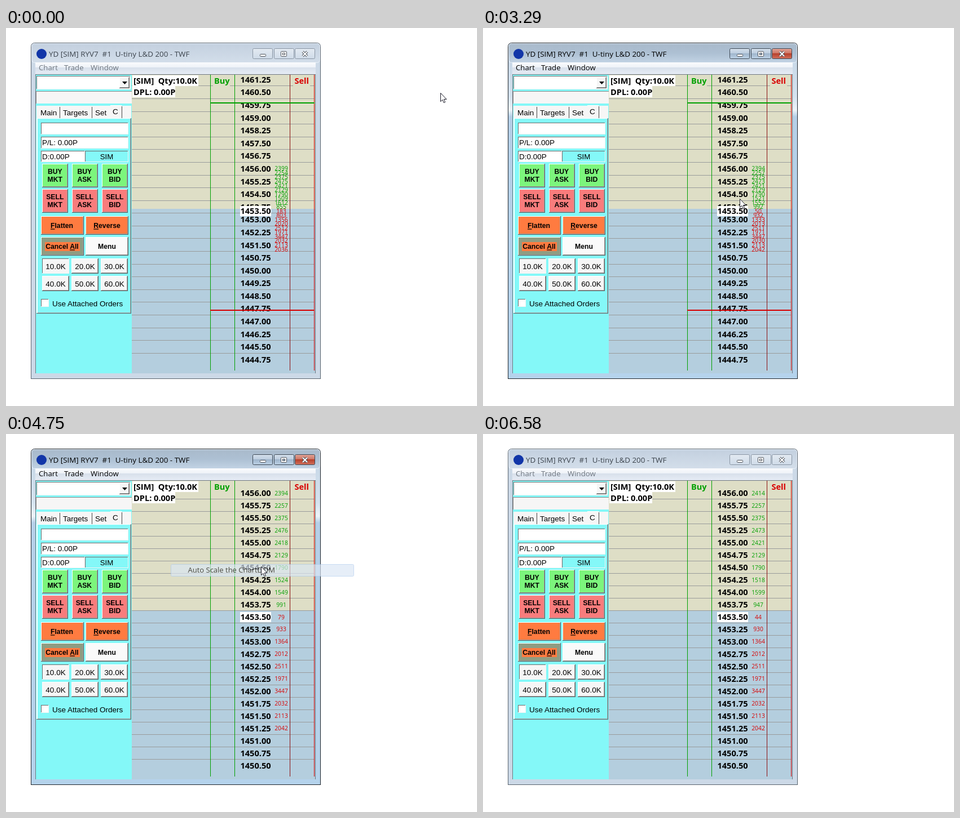
An HTML page that plays this animation: 835x671 px, repeating every 6910 ms.

```html
<!DOCTYPE html>
<html lang="en">
<head>
<meta charset="utf-8">
<title>Trading ladder</title>
<style>
html, body { margin: 0; width: 100%; height: 100%; overflow: hidden; background: #fff; }
svg { display: block; width: 835px; height: 671px; }
rect { shape-rendering: crispEdges; }
.soft { shape-rendering: auto; }
text { white-space: pre; }
.ui { font-family: "Open Sans", "Noto Sans", sans-serif; }
.form { font-family: "Liberation Sans", Arial, sans-serif; }
.mid { text-anchor: middle; }
.b { font-weight: 700; }
</style>
</head>
<body>
<svg viewBox="0 0 835 671" xmlns="http://www.w3.org/2000/svg">
  <defs>
    <linearGradient id="titleOff" x2="0" y2="1"><stop stop-color="#c3d0df"/><stop offset="1" stop-color="#d3deea"/></linearGradient>
    <linearGradient id="titleOn" x2="0" y2="1"><stop stop-color="#a9bacb"/><stop offset=".5" stop-color="#adc0d3"/><stop offset="1" stop-color="#c2d3e4"/></linearGradient>
    <linearGradient id="bar" x2="0" y2="1"><stop stop-color="#fafbfd"/><stop offset=".42" stop-color="#eef2f8"/><stop offset=".45" stop-color="#d8e0eb"/><stop offset="1" stop-color="#e6ecf5"/></linearGradient>
    <linearGradient id="capOff" x2="0" y2="1"><stop stop-color="#e3eaf2"/><stop offset="1" stop-color="#cfdbe8"/></linearGradient>
    <linearGradient id="capOn" x2="0" y2="1"><stop stop-color="#d5e0ec"/><stop offset=".48" stop-color="#bccddf"/><stop offset=".5" stop-color="#9fb5cc"/><stop offset="1" stop-color="#bdd2e6"/></linearGradient>
    <linearGradient id="capRed" x2="0" y2="1"><stop stop-color="#e2a598"/><stop offset=".48" stop-color="#cd7563"/><stop offset=".5" stop-color="#b8402b"/><stop offset="1" stop-color="#d0705c"/></linearGradient>
    <linearGradient id="side" x2="0" y2="1"><stop stop-color="#c2d3e4"/><stop offset=".16" stop-color="#d5e3ef"/><stop offset=".2" stop-color="#eef5fa"/><stop offset=".22" stop-color="#b5d0e8"/><stop offset="1" stop-color="#b5d3ec"/></linearGradient>
  </defs>
  <g id="idle"></g>
  <g id="active"></g>
  <g id="panel"></g>
  <g id="chart"></g>
  <g id="menu"></g>
  <g id="hover"></g>
  <path id="cursor" d="M.5 .5V15.6L3.9 12.4L6.2 17.7L8.6 16.7L6.3 11.5H11Z" fill="#fff" stroke="#1b1b28"/>
</svg>
<script>
const LOOP = 6910;
const el = id => document.getElementById(id);
const rect = (x, y, w, h, fill, more = '') =>
  `<rect x="${x}" y="${y}" width="${w}" height="${h}" fill="${fill}" ${more}/>`;
const text = (x, y, size, str, cls = 'ui', fill = '#000') =>
  `<text x="${x}" y="${y + size * .36}" font-size="${size}" class="${cls}" fill="${fill}">${str}</text>`;
const hline = (x, y, w, fill) => rect(x, y, w, 1, fill);
const vline = (x, y, h, fill) => rect(x, y, 1, h, fill);
const bevel = (x, y, w, h, fill, sunk) => {
  const [lit, dark] = sunk ? ['#6a6a6a', '#f4f4f4'] : ['#ffffff', '#5c5c5c'];
  return rect(x, y, w, h, dark) + rect(x, y, w - 1, h - 1, lit) +
    rect(x + 1, y + 1, w - 2, h - 2, sunk ? fill : '#a0a0a0') +
    rect(x + 1, y + 1, w - 3, h - 3, fill);
};

// Window frame
function frame(on) {
  const ink = on ? '#000' : '#6f7780', edge = on ? '#3f4a56' : '#8a96a4';
  const cap = (x, fill) => rect(x + .5, 36.5, 35, 18, fill, `class="soft" rx="2" stroke="${edge}"`);
  const glyph = '#fff" stroke="#4a5059';
  return rect(44.5, 26.5, 513, 596, on ? 'url(#side)' : '#ccd9e7',
      `class="soft" rx="6" stroke="${on ? '#20262c' : '#59636e'}"`) +
    rect(44.5, 612.5, 513, 10, on ? '#b5d3ec' : '#ccd9e7', `stroke="${on ? '#20262c' : '#59636e'}"`) +
    rect(45, 605, 8, 12, on ? '#b5d3ec' : '#ccd9e7') + rect(549, 605, 8, 12, on ? '#b5d3ec' : '#ccd9e7') +
    rect(45.5, 27.5, 511, 34, on ? 'url(#titleOn)' : 'url(#titleOff)', 'class="soft" rx="5" stroke="#eaf2fa"') +
    rect(52, 61, 497, 21, 'url(#bar)') +
    '<circle cx="63" cy="46" r="9" fill="#1236a8"/>' +
    text(76, 46, 13.4, 'YD [SIM] RYV7\u00a0 #1\u00a0 U-tiny L&amp;D 200 - TWF', 'ui', on ? '#000' : '#3c444d') +
    [[58, 'Chart'], [103, 'Trade'], [150, 'Window']].map(([x, s]) => text(x, 70, 13.2, s, 'ui', ink)).join('') +
    cap(437, on ? 'url(#capOn)' : 'url(#capOff)') + cap(475, on ? 'url(#capOn)' : 'url(#capOff)') +
    cap(512, on ? 'url(#capRed)' : 'url(#capOff)') +
    rect(450.5, 46.5, 10, 4, glyph, 'class="soft" rx="1"') +
    rect(487.5, 41.5, 10, 9, glyph, 'class="soft" rx="1"') +
    rect(490.5, 44.5, 4, 3, on ? '#a9bccf" stroke="#4a5059' : glyph) +
    '<path d="M526 42l8 8m0-8l-8 8" stroke="#4a5059" stroke-width="4"/>' +
    '<path d="M526 42l8 8m0-8l-8 8" stroke="#fff" stroke-width="2"/>';
}

// Order entry panel
function panel() {
  const cyan = '#84f8f8', orange = '#ff7b40', grey = '#f6f6f6';
  const u = s => `<tspan text-decoration="underline">${s}</tspan>`;
  const field = (x, y, w, h, fill = '#fff') => bevel(x, y, w, h, fill, true);
  const label = (x, y, s, cls = 'form') => text(x, y, 13.5, s, cls);
  const bold = (x, y, s) => text(x, y, 12.2, s, 'form b mid');
  let s = rect(52, 82, 497, 531, '#6f7780') + rect(53, 83, 170, 530, cyan) +
    field(54, 85, 167, 24) + bevel(201, 87, 18, 20, grey) +
    '<path d="M206 95h9l-4.500 5z"/>' +
    rect(53, 112, 170, 22, grey) + hline(53, 112, 170, '#8a8a8a') + vline(53, 112, 22, '#8a8a8a') +
    rect(54, 138, 168, 22, grey) + hline(185, 137, 20, '#fff') +
    vline(95, 140, 20, '#444') + vline(152, 140, 20, '#444') + vline(205, 139, 21, '#444') +
    label(61, 150.500, 'Main') + label(101, 150.500, 'Targets') + label(158, 150.500, 'Set') + label(189, 148.500, 'C') +
    rect(54, 160, 168, 347, '#5c6c70') + rect(54, 160, 167, 346, '#fff') +
    rect(56, 161, 164, 344, cyan) + hline(56, 505, 164, '#a4b4b4') + vline(220, 161, 345, '#a4b4b4') +
    field(62, 168, 155, 21) + field(62, 193, 155, 21) + label(64, 203.500, 'P/L: 0.00P') +
    field(62, 218, 78, 20) + label(64, 228, 'D:0.00P') +
    field(140, 218, 77, 20, cyan) + text(178.5, 228, 13.2, 'SIM', 'form mid');
  [64, 116.5, 170].forEach((x, i) => {
    const kind = ['MKT', 'ASK', 'BID'][i], c = x + 22.8;
    s += bevel(Math.round(x), 241, 46, 42, '#7cf57c') + bold(c, 255, 'BUY') + bold(c, 269, kind) +
      bevel(Math.round(x), 286, 46, 42, '#f87c7c') + bold(c, 300, 'SELL') + bold(c, 314, kind);
  });
  s += bevel(62, 334, 76, 33, orange) + bold(99, 351, u('F') + 'latten') +
    bevel(141, 334, 76, 33, orange) + bold(179, 351, u('R') + 'everse') +
    bevel(62, 371, 76, 33, '#8f9c82') + rect(69, 380, 62, 16, orange) + bold(99.5, 388, 'Cancel ' + u('A') + 'll') +
    bevel(141, 371, 76, 33, '#fafafa') + bold(179, 388, 'Menu');
  for (let i = 0; i < 6; i++) {
    const x = 64 + i % 3 * 52, y = i < 3 ? 409 : 440;
    s += bevel(x, y, 48, 27, '#f6f6f6', i === 0) + label(x + 24, y + 14, (i + 1) * 10 + '.0K', 'form mid');
  }
  return s + field(62, 481, 14, 14) + label(82, 489, 'Use Attached Orders');
}

// Depth: start time, ticks below 1456.00 of the first row, ten asks then ten bids
const calm = [2394,2257,2375,2473,2421,2129,1790,1521,1552,992,50,932,1333,2013,2511,1971,3447,2030,2113,2042];
const books = [
  [0, 0, [2399,2254,2375,2475,2421,2129,1790,1509,1612,855,183,803,1356,2020,2512,1971,3447,2032,2113,2036]],
  [1290, 1, [2252,2375,2474,2421,2131,1790,1732,1784,1065,87,778,1148,1793,2511,1971,3450,2030,2113,2037,1911]],
  [1890, 0, calm],
  [2160, 1, [2256,2375,2473,2421,2129,1790,1745,1770,1081,6,831,1148,1792,2511,1971,3450,2030,2113,2045,1912]],
  [2650, 0, calm],
  [4750, 0, [2394,2257,2375,2476,2418,2129,1790,1524,1549,991,79,933,1364,2012,2511,1971,3447,2032,2113,2042]],
  [6000, 0, [2414,2257,2375,2473,2421,2129,1790,1518,1599,947,44,930,1364,2012,2511,1971,3447,2032,2113,2042]]
];
const ZOOM = 4750;

function chart(book) {
  const [start, first, sizes] = book;
  const zoomed = start >= ZOOM;
  const top = zoomed ? 1456 : 1461.25, ticks = zoomed ? 1 : 3;
  const y0 = zoomed ? 105 : 91.6, gap = zoomed ? 21.98 : 22.59, tick = gap / ticks;
  const yOf = price => y0 + (top - price) * 4 * tick;
  const split = Math.round(yOf(1456 - (first + 10) / 4) - tick / 2);
  const green = '#00a000', red = '#d80000', sand = '#dedec6';
  let s = rect(223, 83, 325, split - 83, sand) + rect(223, split, 325, 613 - split, '#b4cede');
  for (let i = 0; i < 22; i++) s += hline(223, Math.round(y0 + gap * (i + .5) - .5), 324, '#999b9b');
  s += rect(224, 84, 117, 19, '#fff') + rect(224, 103, 76, 20, '#fff') +
    rect(367, 84, 30, 20, sand) + rect(509, 84, 30, 20, sand) +
    vline(362, 83, 525, green) + vline(405, 83, 525, green) +
    vline(503, 83, 525, '#8c1010') + vline(546, 83, 525, red) +
    text(226, 93.5, 14.57, '[SIM]\u00a0 Qty:10.0K', 'ui b') + text(226, 113.5, 14.57, 'DPL: 0.00P', 'ui b') +
    text(369, 93.5, 14.57, 'Buy', 'ui b', green) + text(511.5, 93.5, 14.57, 'Sell', 'ui b', red);
  const price = p => text(415.5, yOf(p), 14.57, p.toFixed(2), 'ui b');
  for (let i = 0; i < 23; i++) s += price(top - i * ticks / 4);
  s += rect(415, 316, 55, 18, '#fff') + price(1453.5);
  sizes.forEach((n, i) => {
    s += text(488, yOf(1456 - (first + i) / 4), 10.3, n, 'ui mid', i < 10 ? green : red);
  });
  if (!zoomed) s += rect(362, 132, 185, 2, green) + rect(362, 500, 185, 2, red);
  return s;
}

// Context menu
const items = [
  [168.5, 'Interactive Scale Range'], [190.5, 'Interactive Scale Move'], [212.5, 'Interactive Scale Locked'],
  [241.5, 'Auto Scale the ChartDOM'], [271, 'Set X &amp; Y Constant Relationship'],
  [300, 'Reset'], [322, 'Reset and Lock'], [344, 'Scale...'],
  [373, 'Scale Range: Automatic'], [395, 'Scale Range: Independent'],
  [417, 'Scale Range: Constant Range'], [439, 'Scale Range: Constant Range Autocenter']
];
const OFF = 4;
const item = i => text(322.5, items[i][0], 13, items[i][1], 'ui', i === OFF ? '#777' : '#000');
const glow = i => rect(292.5, Math.round(items[i][0] - 11) + .5, 324, 21, i === OFF ? '#dfe5ec' : '#dbe7f5',
  `class="soft" rx="2" stroke="${i === OFF ? '#cfd6de' : '#aecbee'}"`) + item(i);

function menu() {
  const radio = y => rect(292.5, y - 10.5, 21, 21, '#dce8f6', 'class="soft" rx="2" stroke="#b0cdec"') +
    `<circle cx="303" cy="${y}" r="4.500" fill="#16276b"/><circle cx="302" cy="${y - 1}" r="1.600" fill="#7f9be0"/>`;
  return rect(293, 158, 330, 298, '#000', 'opacity=".1"') + rect(292, 157, 330, 297, '#000', 'opacity=".25"') +
    rect(289.5, 154.5, 330, 297, '#f4f4f4', 'stroke="#8e9688"') +
    vline(317, 156, 294, '#e2e3e3') + vline(318, 156, 294, '#fff') +
    [226, 256, 285, 357].map(y => hline(319, y, 298, '#dedfdf') + hline(319, y + 1, 298, '#fff')).join('') +
    radio(190) + radio(416) + items.map((_, i) => item(i)).join('');
}

// Cursor moves: start, end, steps, from, bend, to, easing
const easeIn = p => f => f ** p;
const easeOut = p => f => 1 - (1 - f) ** p;
const moves = [
  [60, 430, 6, [770, 115], [753, 113], [737, 112], easeOut(1.2)],
  [1620, 2290, 11, [737, 112], [686, 141], [634, 171], easeIn(2.3)],
  [2350, 2830, 9, [634, 171], [544, 237], [455, 303], easeOut(1.37)],
  [3940, 4430, 8, [455, 303], [444, 269], [452, 235], easeOut(1.23)],
  [5190, 5450, 2, [452, 235], [451, 235], [451, 236], easeIn(1)],
  [5710, 6320, 10, [451, 236], [625, 103], [800, -30], easeIn(1.5)]
];

function cursorAt(t) {
  let pos = moves[0][3];
  for (const [start, end, steps, a, b, c, ease] of moves) {
    if (t < start) break;
    const step = Math.min(steps, Math.floor((t - start) / (end - start) * (steps - 1) + 1e-6) + 1);
    const u = ease(step / steps), v = 1 - u;
    pos = [0, 1].map(k => Math.round(v * v * a[k] + 2 * u * v * b[k] + u * u * c[k]));
  }
  return pos;
}

const menuFade = t => t < 3490 || t >= 4690 ? 0 : t < 3590 ? .35 : t < 3680 ? .7 : 1;
const chosenFade = t => Math.max(0, 1 - (Math.floor((t - 4690) / 60) + 1) / 6);

el('idle').innerHTML = frame(false);
el('active').innerHTML = frame(true);
el('panel').innerHTML = panel();
el('menu').innerHTML = menu();

const shown = {};
function update(id, key, build) {
  if (shown[id] === key) return;
  shown[id] = key;
  el(id).innerHTML = build();
}

function draw(t) {
  const on = t >= 3290 && t < 6580;
  el('active').style.display = on ? '' : 'none';
  el('idle').style.display = on ? 'none' : '';

  const n = books.filter(b => b[0] <= t).length - 1;
  update('chart', n, () => chart(books[n]));

  const [x, y] = cursorAt(t);
  el('cursor').setAttribute('transform', `translate(${x} ${y})`);

  el('menu').style.opacity = menuFade(t);
  const closing = t >= 4690 && t < 4990;
  const hit = t >= 3940 && t < 4990 ? items.findIndex(([c]) => Math.abs(y - c) <= 11) : -1;
  update('hover', hit, () => hit < 0 ? '' : glow(hit));
  el('hover').style.opacity = closing ? chosenFade(t) : 1;
}

const began = performance.now();
function tick() {
  draw((performance.now() - began) % LOOP);
  requestAnimationFrame(tick);
}
draw(0);
requestAnimationFrame(tick);
</script>
</body>
</html>
```
